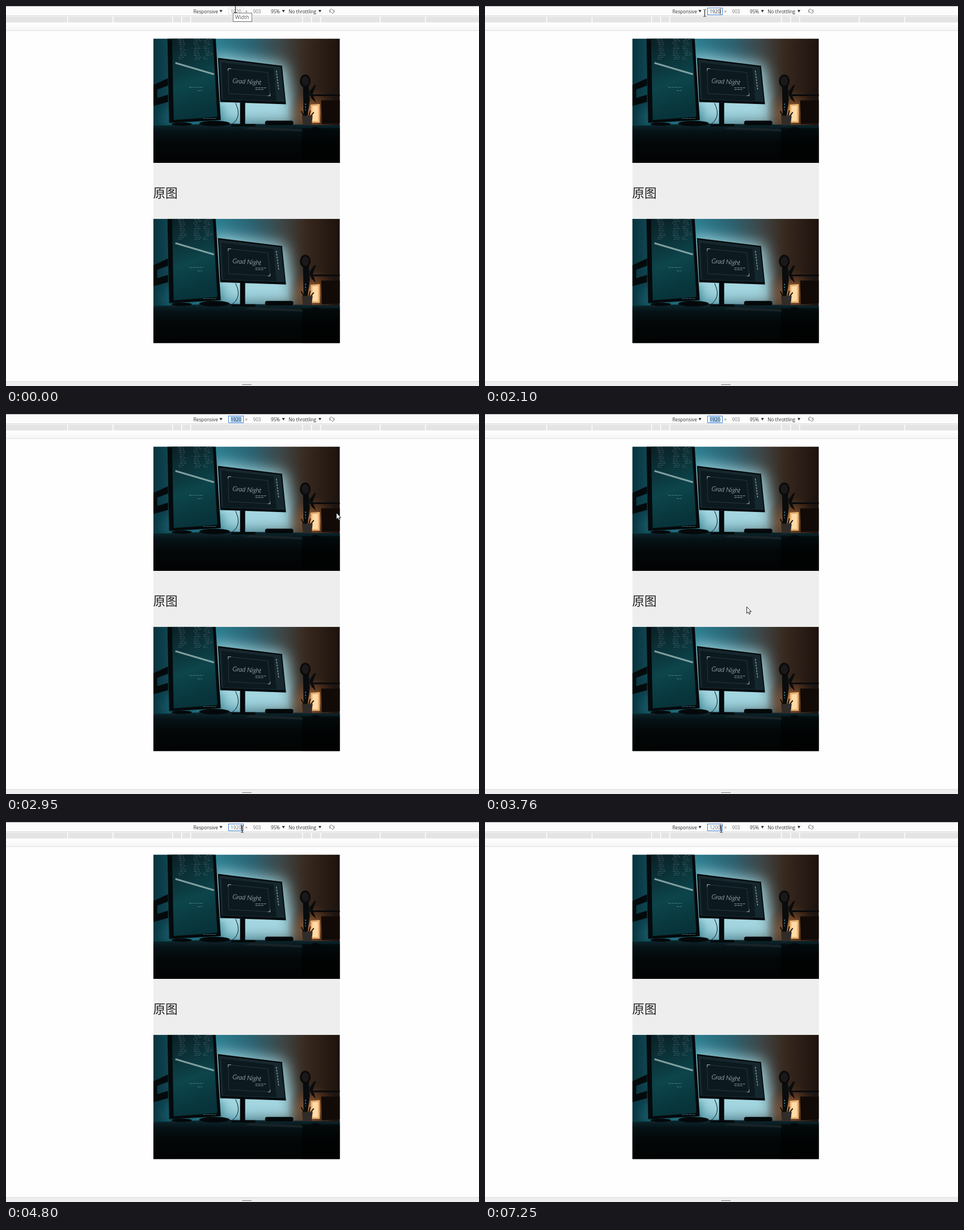
Recreate the animation shown at these times as an HTML page. Size 834 px wide and 671 px high, loop 8000 ms.

```html
<!DOCTYPE html>
<html lang="zh-CN">
<head>
<meta charset="utf-8">
<title>Responsive width</title>
<style>
  html, body { margin: 0; width: 100%; height: 100%; overflow: hidden; background: #fefefe; }
  svg { display: block; }
  .ui { font: 8.2px "Open Sans", "Noto Sans", sans-serif; fill: #333; }
  .ui .dim { fill: #777; }
  .cjk { font: 21.6px "Noto Sans CJK SC", "Noto Sans CJK", sans-serif; fill: #212121; }
  .script { font: italic 300 11.5px Lato, sans-serif; fill: #e8eeee; }
</style>
</head>
<body>
<svg width="834" height="671" viewBox="0 0 834 671">
  <defs>
    <linearGradient id="wall">
      <stop offset="0" stop-color="#07333d"/><stop offset=".33" stop-color="#2a7f91"/>
      <stop offset=".52" stop-color="#2b6474"/><stop offset=".7" stop-color="#3e4443"/>
      <stop offset=".82" stop-color="#38281e"/><stop offset="1" stop-color="#1c120d"/>
    </linearGradient>
    <radialGradient id="warm">
      <stop offset="0" stop-color="#d89655"/><stop offset=".4" stop-color="#8f552b" stop-opacity=".65"/>
      <stop offset="1" stop-color="#4a2814" stop-opacity="0"/>
    </radialGradient>
    <linearGradient id="screen" x2=".2" y2="1">
      <stop offset="0" stop-color="#0a1f25"/><stop offset=".6" stop-color="#0c454b"/>
      <stop offset="1" stop-color="#08333a"/>
    </linearGradient>
    <linearGradient id="desk" x2="0" y2="1">
      <stop offset="0" stop-color="#0d2930"/><stop offset=".2" stop-color="#061216"/>
      <stop offset=".5" stop-color="#030708"/><stop offset="1" stop-color="#020303"/>
    </linearGradient>
    <linearGradient id="strip" x2="0" y2="1">
      <stop offset="0" stop-color="#fff"/><stop offset="1" stop-color="#f5f5f5"/>
    </linearGradient>
    <filter id="soft" x="-50%" y="-50%" width="200%" height="200%"><feGaussianBlur stdDeviation="13"/></filter>
    <clipPath id="crop"><path d="M0 0H329V219.500H0z"/></clipPath>

    <g id="photo" clip-path="url(#crop)">
      <path fill="url(#wall)" d="M0 0H329V220H0z"/>
      <path fill="#a3d6e0" filter="url(#soft)" d="M104 28 232 46 252 150H112z"/>
      <path fill="#1d6b7a" filter="url(#soft)" d="M20 130H120V152H20z"/>
      <ellipse cx="280" cy="131" rx="44" ry="46" fill="url(#warm)"/>
      <path fill="#040a0c" d="M0 82 26 70V83L7 90V105L26 99V112L0 119z"/>
      <!-- desk -->
      <path fill="url(#desk)" d="M0 154 120 150 329 153V220H0z"/>
      <path fill="#000" opacity=".5" d="M262 158H329V220H262z"/>
      <!-- tall screen -->
      <path fill="#05090b" d="M25 0H110L119 144 28 149z"/>
      <path fill="url(#screen)" d="M33 0H105L113 138 36 144z"/>
      <path id="code" stroke="#8ba3a6" stroke-width=".8" opacity=".5"/>
      <path stroke="#a9bfc0" stroke-width="3" opacity=".75" d="M39 43 107 63"/>
      <path stroke="#4f888d" stroke-width=".8" stroke-dasharray="5 1" d="M63 86H88M78 92H87M88 141H111"/>
      <!-- stands and small things -->
      <path fill="#04080a" d="M153 113H162V151H180V155H138V152H153z"/>
      <path fill="none" stroke="#06161b" d="M145 114Q158 140 136 153"/>
      <g fill="#04080a">
        <ellipse cx="50" cy="151" rx="18" ry="3"/>
        <ellipse cx="108" cy="150" rx="27" ry="5"/>
        <rect x="197" y="145" width="50" height="8" rx="4"/>
        <ellipse cx="286" cy="160" rx="8" ry="4"/>
      </g>
      <path fill="#182327" d="M162 160 172 156 262 160 264 164z"/>
      <!-- wide screen -->
      <path fill="#04090c" d="M114 34 227 48 234 116 118 112z"/>
      <path fill="#16282e" d="M116 37 225 50 232 112 120 108z"/>
      <path fill="#0c1a20" d="M120 42 212 53 217 110 123 107z"/>
      <path stroke="#8fa0a3" stroke-width="1.500" stroke-dasharray="3 2" d="M217 57 221 90"/>
      <path fill="none" stroke="#354b52" stroke-width=".6" d="M132 53 202 60 206 101 133 97z"/>
      <path fill="none" stroke="#cbd5d6" stroke-width=".8" d="M132 57V53H137M206 97V101H202"/>
      <path stroke="#a6b5b8" stroke-width=".8" stroke-dasharray="4 1" d="M180 87H200M180 90H194"/>
      <text class="script" text-anchor="middle" transform="translate(165 80) rotate(4)">Grad Night</text>
      <!-- lamp, speaker, microphone, pen cup -->
      <path fill="#ffdba8" stroke="#eab172" stroke-width="3" d="M279 118 292 117V147H279z"/>
      <path fill="#120a06" d="M296 109H329V149L297 151z"/>
      <path stroke="#090b0d" stroke-width="3" d="M276 100H329"/>
      <path fill="#090c0e" d="M275 94 284 82H287L281 98 287 113 279 106zM264 79H274L276 108 272 138H265z"/>
      <ellipse cx="268" cy="75" rx="8" ry="10" fill="#1a1919" stroke="#08090a" stroke-width="3"/>
      <path stroke="#5ca2b0" stroke-width="1.500" stroke-dasharray="2 3" d="M268.500 115V128"/>
      <path stroke="#08090a" stroke-width="1.800" d="M266 138 261 128M270 138 268 126M274 138 277 127M277 138 283 130"/>
      <path fill="#302c2a" d="M262 136H281L279 153H264z"/>
    </g>
  </defs>

  <path fill="#fcfcfc" d="M0 0H834V18H0z"/>
  <path fill="#aaa" d="M0 0H834V1H0z"/>
  <path fill="#d0d0d0" d="M0 17H834V18H0z"/>
  <path fill="#e4e4e4" d="M0 19H834V29H0z"/>
  <path id="gaps" stroke="#fff" stroke-width="1.500"/>
  <path fill="url(#strip)" d="M0 29H834V43H0z"/>
  <path fill="#dedede" d="M0 43H834V44H0z"/>

  <path fill="#eee" d="M260 277H588.700V376H260z"/>
  <use href="#photo" x="259.700" y="57.500"/>
  <use href="#photo" x="259.700" y="375.700"/>
  <text class="cjk" x="259.500" y="338">原图</text>
  <path fill="#eee" stroke="#d8d8d8" d="M-1 663H835V672H-1z"/>
  <path stroke="#777" d="M416.500 668.500H433"/>

  <g class="ui">
    <text x="330.500" y="13">Responsive</text>
    <text x="467" y="13">95%</text>
    <text x="498.300" y="13">No throttling</text>
    <text x="421.500" y="13" class="dim">×</text>
    <text x="435.500" y="13" class="dim">903</text>
    <path d="M376.500 7h5l-2.500 4.500zM486.700 7h5l-2.500 4.500zM551 7h5l-2.500 4.500z"/>
  </g>
  <g fill="none" stroke="#777" stroke-width=".9" transform="rotate(-45 574.600 9.100)">
    <rect x="572.300" y="5.300" width="4.600" height="7.600" rx="1"/>
    <circle cx="574.600" cy="9.100" r="4.200" stroke-dasharray="6.600"/>
  </g>

  <rect id="field" x="392.500" y="3.500" width="26" height="12" fill="#fff"/>
  <path id="mark" fill="#a5cdf8" d="M396 4.500H415.200V14.500H396z"/>
  <text id="value" class="ui" x="405.500" y="13" text-anchor="middle"></text>
  <path id="caret" fill="#111" d="M0 4.500H.9V14.500H0z"/>
  <g id="tip">
    <rect x="400.500" y="12.500" width="33" height="15" fill="#fff" stroke="#777"/>
    <text class="ui" x="404" y="23" style="font-size:9px;fill:#555">Width</text>
  </g>
  <path id="beam" fill="none" stroke="#111" d="M-2 -5.500H-.5M.5 -5.500H2M0 -5V6M-2 6.500H-.5M.5 6.500H2"/>
  <path id="arrow" fill="#fff" stroke="#111" stroke-width=".9" stroke-linejoin="round"
        d="M.5 .5V12L3.100 9.600 5 13.700 6.800 12.900 5 9H8.600z"/>
</svg>

<script>
const $ = id => document.getElementById(id);

// Ruler gaps mirror around the middle of the page
$('gaps').setAttribute('d', [98.5, 114.5, 130.5, 235.5, 315.5]
  .map(d => `M${424.2 - d} 19V29M${424.2 + d} 19V29`).join(''));

// Ragged lines of code on the tall screen
let seed = 7, lines = '';
const rand = () => (seed = seed * 16807 % 2147483647) / 2147483647;
for (const left of [43, 70, 88])
  for (let y = 1; y < 39; y += 3.2)
    lines += `M${left + rand() * 5} ${y}h${2 + rand() * 5}m1.5 0h${1 + rand() * 4}`;
$('code').setAttribute('d', lines);

// Pointer moves: start, end, path
const moves = [
  [120, 420, 'M405 5Q398 16 404 6'],
  [790, 1120, 'M404 6Q407 8 415 11'],
  [1320, 1790, 'M415 11C435 16 352 12 388 12'],
  [2100, 2900, 'M388 12C560 40 700 130 712 215S620 270 582 177'],
  [2920, 3710, 'M582 177C588 110 598 200 592 300S550 575 510 577 380 480 461 340'],
  [3760, 4530, 'M461 340C500 540 450 520 440 390S425 60 419 15'],
  [4560, 4800, 'M419 15L417 12']
].map(([start, end, d]) => {
  const path = document.createElementNS('http://www.w3.org/2000/svg', 'path');
  path.setAttribute('d', d);
  return { start, end, path, length: path.getTotalLength() };
});
const erased = [5320, 5860, 5920, 5990], typed = [6700, 6760, 6990, 7250];

const within = (t, a, b) => t >= a && t < b;
const count = (times, t) => times.filter(s => s <= t).length;
const show = (id, on) => $(id).style.display = on ? '' : 'none';
const move = (id, x, y) => $(id).setAttribute('transform', `translate(${x} ${y})`);

function pointer(t) {
  const { start, end, path, length } = moves.filter(m => m.start <= t).pop() || moves[0];
  const k = Math.min(1, Math.max(0, (t - start) / (end - start)));
  return path.getPointAtLength(length * (1 - Math.cos(Math.PI * k)) / 2);
}

function draw(t) {
  const { x, y } = pointer(t);
  const text = t < typed[0] ? '1920'.slice(0, 4 - count(erased, t)) : '1200'.slice(0, count(typed, t));
  const focus = t >= 250, selected = within(t, 2130, 4760);
  const arrow = y > 20, hover = !arrow && within(x, 392, 421);
  const invalid = +text < 50;

  $('field').setAttribute('stroke', invalid ? '#f03a2e' : focus ? '#3f82d8' : '#e0e0e0');
  $('value').textContent = text;
  $('value').style.fill = hover ? '#6c6c6c' : '#333';
  show('mark', selected);
  show('tip', t < 150);
  show('caret', focus && !selected && !within(t, 6460, typed[0]));
  move('caret', t < 1350 ? 400 : 405 + text.length * 2.4, 0);
  show('beam', !arrow);
  show('arrow', arrow);
  move('arrow', Math.round(x), Math.round(y));
  move('beam', Math.round(x) - .5, Math.round(y));
}

function tick() {
  draw(performance.now() % 8000);
  requestAnimationFrame(tick);
}
tick();
</script>
</body>
</html>
```
